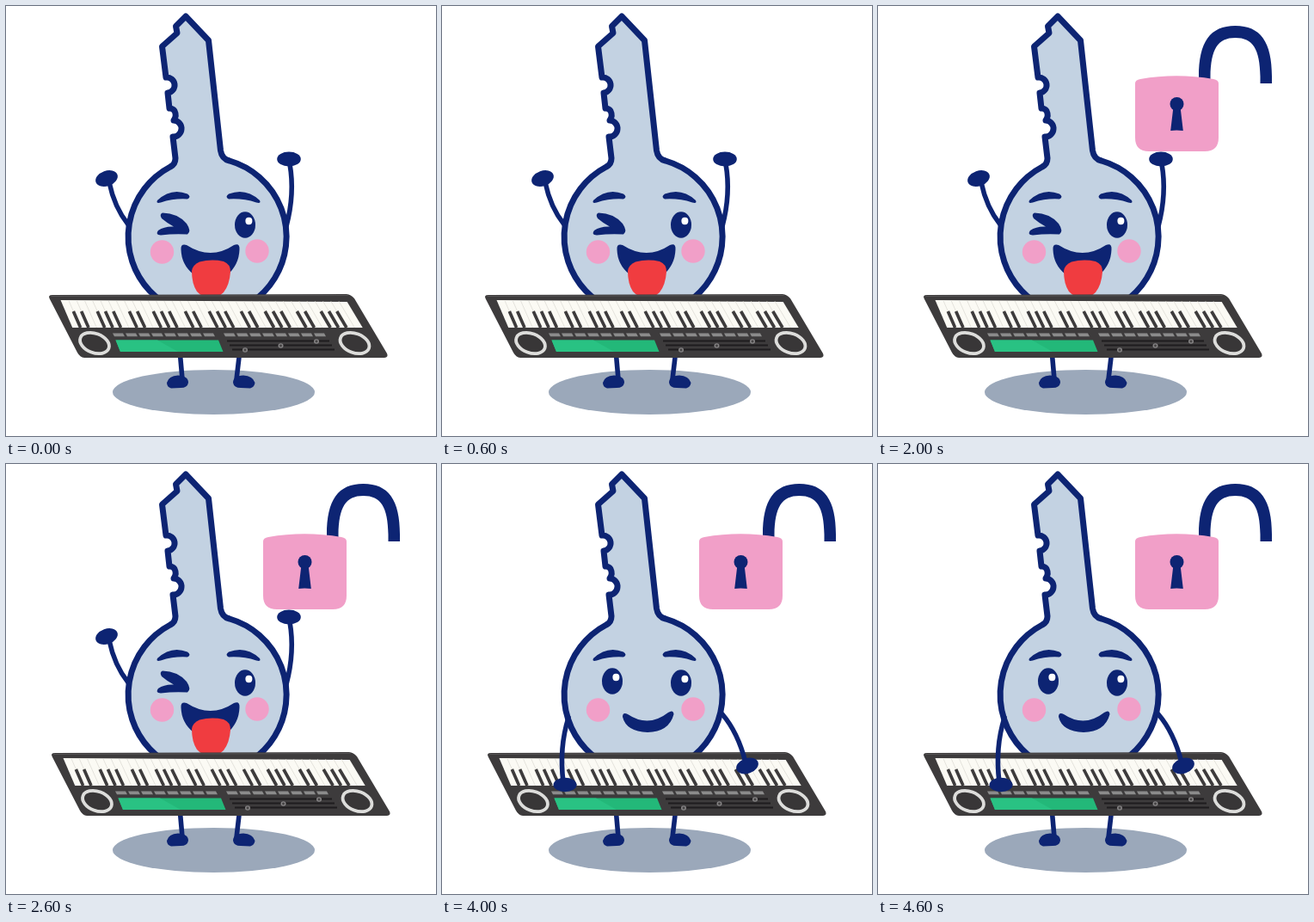
Write an HTML page with a canvas that moves like this. It is 500x500 px and loops after 5 s.

```html
<!DOCTYPE html>
<html lang="en">
<head>
<meta charset="utf-8">
<title>Key with a keyboard</title>
<style>
html, body { margin: 0; width: 100%; height: 100%; overflow: hidden; background: #fff; }
canvas { display: block; width: 500px; height: 500px; }
</style>
</head>
<body>
<canvas id="stage"></canvas>
<script>
const canvas = document.getElementById('stage');
const ctx = canvas.getContext('2d');
const dpr = window.devicePixelRatio || 1;
canvas.width = canvas.height = 500 * dpr;

const NAVY = '#0d2473', STEEL = '#c3d2e2', PINK = '#f19fc8', RED = '#f03c40';
const DARK = '#3d3b3c', IVORY = '#fbfaf4', GREY = '#8b8b8b';
const LIMB = 5.6;

const BEAT = 1000;
const POSES = [
  { up: true, mouth: 'laugh', shift: 0, lock: null },
  { up: false, mouth: 'laugh', shift: 3, lock: 'closed' },
  { up: true, mouth: 'laugh', shift: 3, lock: 'open' },
  { up: false, mouth: 'laugh', shift: 0, lock: 'open' },
  { up: false, mouth: 'smile', shift: 3, lock: 'open' }
];

function fill(d, color) {
  ctx.fillStyle = color;
  ctx.fill(new Path2D(d));
}

function line(d, width, color = NAVY, cap = 'round') {
  ctx.lineWidth = width;
  ctx.lineCap = cap;
  ctx.lineJoin = 'round';
  ctx.strokeStyle = color;
  ctx.stroke(new Path2D(d));
}

function oval(x, y, rx, ry = rx, color = NAVY, deg = 0) {
  ctx.beginPath();
  ctx.ellipse(x, y, rx, ry, deg * Math.PI / 180, 0, 2 * Math.PI);
  ctx.fillStyle = color;
  ctx.fill();
}

function drawFeet() {
  oval(241.5, 449, 117.5, 26, '#9ba8ba');
  line('M202 400 L205 434', LIMB);
  line('M272 400 L268 434', LIMB);
  fill('M187 438 Q189 430 200 429.5 Q212 430 212 438 Q211 444 203 444 L192 444.5 Q187 443 187 438Z', NAVY);
  fill('M289.5 438 Q287 430 276 429.5 Q264 430 264 438 Q265 444 273 444 L284 444.5 Q289 443 289.5 438Z', NAVY);
}

function drawBody() {
  const d = 'M209 12 L235.5 40 L249.5 168 Q251 178 260 180 A92 92 0 1 1 191 187 ' +
    'Q197 184 197 177 L194 152 A9.3 9.3 0 0 0 195 133 Q199 128 196 122 Q194 119 190 119 ' +
    'L188 101 A9 9 0 0 0 186 83 L181.5 47 L199 31.5 L197.5 23.5Z';
  fill(d, STEEL);
  line(d, 7);
}

function drawEye(x, y) {
  oval(x, y, 12, 15.3);
  oval(x + 4.4, y - 4.5, 4, 4.2, '#fff');
}

function drawFace(pose) {
  fill('M176 226 Q192 211 211 218.5 Q216 222 211 224.5 Q195 223.5 180 228.5 Q174 230 176 226Z', NAVY);
  fill('M295 226 Q279 211 259 218.5 Q254 222 259 224.5 Q276 223.5 291 228.5 Q297 230 295 226Z', NAVY);
  drawEye(278, 254.5);
  if (pose.up) {
    fill('M182 240.5 Q200 241 210 253 Q216 262 211 265.5 Q195 264.5 180 266.5 Q173 266 177 261 ' +
      'Q184 256 195 256.5 Q188 253 181 247 Q178 242 182 240.5Z', NAVY);
  } else {
    drawEye(198, 252.5);
  }
  oval(181.5, 286, 13.7, 13.7, PINK);
  oval(292, 285, 13.7, 13.7, PINK);
  if (pose.mouth === 'smile') {
    fill('M210 294 Q210 288 216 291 Q240 307 263 289 Q269 285 269.5 291 ' +
      'Q264 311.5 239 312 Q214 311 210 294Z', NAVY);
    return;
  }
  fill('M203.5 283 Q203 276 210 278 Q238 296 265 278 Q272 275 271.5 283 ' +
    'Q271 301 257 313 Q238 324 218 312 Q204 301 203.5 283Z', NAVY);
  fill('M216 308 Q217 301 225 297.5 Q239 294 253 297 Q261 300 261 309 ' +
    'Q260 324 253 333 Q247 339 238 339 Q228 339 222 332 Q216 323 216 308Z', RED);
}

function drawRaisedArms() {
  line('M120 205 Q126 234 142 254', LIMB);
  oval(117, 200.5, 13.3, 8.8, NAVY, -20);
  line('M330 184 Q336 218 326 256', LIMB);
  oval(329, 178, 13.8, 8.4);
}

function drawPlayingArms() {
  line('M147 295 Q136 330 141 370', LIMB);
  oval(143, 373, 13.5, 8.2);
  line('M326 291 Q344 312 353 347', LIMB);
  oval(355, 351, 13.3, 8.8, NAVY, -20);
}

// x on the key bed: u runs 0..1 across, y is the stage row
function keyX(u, y) {
  const left = 63.5 + (y - 342) * 0.43;
  const right = 395.5 + (y - 342) * 0.6;
  return left + (right - left) * u;
}

function drawKeys() {
  const bed = `M${keyX(0, 342)} 342 L${keyX(1, 344)} 344 L${keyX(1, 374)} 374 L${keyX(0, 374)} 374Z`;
  fill(bed, IVORY);
  const count = 36;
  for (let i = 1; i < count; i++) {
    const u = i / count;
    line(`M${keyX(u, 343)} 343 L${keyX(u, 374)} 374`, 0.6, '#d3d2cc', 'butt');
    if (![0, 3].includes(i % 7)) {
      line(`M${keyX(u, 355)} 355 L${keyX(u, 374)} 374`, 3.7, DARK, 'butt');
    }
  }
}

function drawSpeaker(x, y) {
  ctx.beginPath();
  ctx.ellipse(x, y, 17.6, 11.2, 0.36, 0, 2 * Math.PI);
  ctx.fillStyle = '#383637';
  ctx.fill();
  ctx.lineWidth = 3.8;
  ctx.strokeStyle = '#dddddb';
  ctx.stroke();
}

function drawPiano(shift) {
  ctx.save();
  ctx.translate(shift, 0);
  const shell = 'M54 336 L396 335 Q401 335.5 405 340 L443 404 Q445 408.5 440 409 ' +
    'L91 409 Q86 408.5 83 403 L51 341 Q48 336 54 336Z';
  fill(shell, DARK);
  line('M53 337.5 L397 336.5', 1.2, '#565455');
  drawKeys();
  for (const start of [124, 253]) {
    for (let i = 0; i < 8; i++) {
      const x = start + i * 15;
      fill(`M${x} 380.5 h12 l2 3.7 h-12Z`, GREY);
    }
  }
  fill('M127.5 388.5 H247 L252.5 402 H133Z', '#23b879');
  fill('M127.5 388.5 H176 L200 402 H133Z', '#29c283');
  for (let i = 0; i < 3; i++) {
    const y = 389.5 + i * 5;
    line(`M${257 + i * 3} ${y} H${376 + i * 3}`, 2, '#1f1d1e', 'butt');
    oval(361 - i * 41.5, y + 0.5, 3, 2.8, '#858384');
    oval(361 - i * 41.5, y + 0.5, 1.5, 1.4, '#454344');
  }
  drawSpeaker(103, 392);
  drawSpeaker(405.5, 392);
  ctx.restore();
}

function drawLock(state) {
  const open = state === 'open';
  ctx.save();
  ctx.translate(open ? 68 : 0, 0);
  fill('M305 90 V82 C305 42 318 23 347.5 23 C377 23 390 42 390 82 V90 H376.5 V82 ' +
    'C376 50 368 37 347.5 37 C327 37 319 50 318.5 82 V90Z', NAVY);
  ctx.restore();
  const top = open
    ? 'M299 90 Q299 86 305 85 Q347 77.5 390 85 Q396 86 396 90'
    : 'M299 88 Q300 83.5 308 83 Q347 81 387 83 Q395 83.5 396 88';
  const low = open ? 169 : 170;
  fill(`${top} V${low - 16} Q396 ${low} 380 ${low} H315 Q299 ${low} 299 ${low - 16}Z`, PINK);
  oval(347.5, 114, 8);
  fill('M343.5 117 H351.5 L354.8 145 Q347 144 340.2 145Z', NAVY);
}

function draw(time) {
  const pose = POSES[Math.floor(time / BEAT) % POSES.length];
  ctx.setTransform(dpr, 0, 0, dpr, 0, 0);
  ctx.fillStyle = '#fff';
  ctx.fillRect(0, 0, 500, 500);
  drawFeet();
  if (pose.lock) drawLock(pose.lock);
  if (pose.up) drawRaisedArms();
  drawBody();
  drawFace(pose);
  drawPiano(pose.shift);
  if (!pose.up) drawPlayingArms();
}

const start = performance.now();
function tick() {
  draw(performance.now() - start);
  requestAnimationFrame(tick);
}
tick();
</script>
</body>
</html>
```
